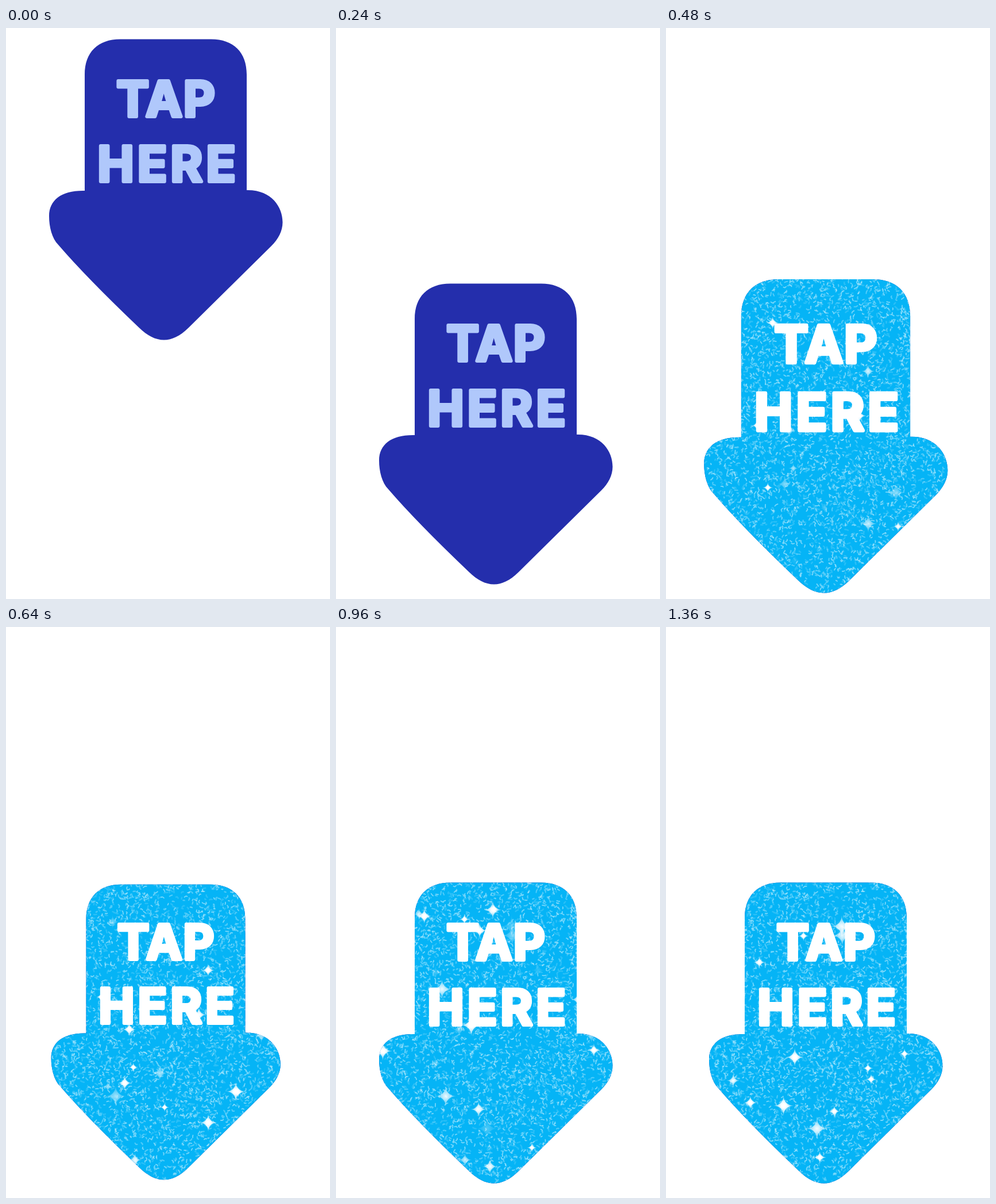
These frames come from a looping animation (564 by 993 pixels, 1440 ms). An HTML page with a canvas:

```html
<!DOCTYPE html>
<html lang="en">
<head>
<meta charset="utf-8">
<title>Tap here</title>
<style>
  html, body { margin: 0; width: 100%; height: 100%; overflow: hidden; background: #fff; }
  canvas { display: block; width: 564px; height: 993px; }
</style>
</head>
<body>
<canvas id="stage" width="564" height="993"></canvas>
<script>
const W = 564, H = 993, STEP = 80, LOOP = 1440;
const FALL = 425, LANDED = 229, WOBBLE_FROM = 320, GLITTER_FROM = 480, SETTLED = 800;
const BLUE = '#242eac', PALE = '#b0c8fb', SKY = '#05b4f6';
const CENTER = 278, ARROW_PIVOT = 620, TEXT_PIVOT = 503;
const ctx = document.getElementById('stage').getContext('2d');

const arrow = new Path2D(`
  M137 81 C137 42 160 19.5 199 19.5 H357 C396 19.5 419 42 419 81 V282
  C462 281 481.5 311 481.5 338 C481.5 353 474 367 462 379
  L317 522 C303 535.5 289 542.5 275 542.5 C260 542.5 246 535 232 521.5
  Q140 434 91 377 C80 366 75 346 75 327 C75 299 97 282 137 283 Z`);

// Height still to fall, at constant speed
const heightAt = t => FALL * Math.max(0, 1 - t / LANDED);

// Damped spring after the landing
function scaleAt(t) {
  if (t < WOBBLE_FROM || t >= SETTLED) return 1;
  return 1 + 0.102 * Math.exp((400 - t) / 138) * Math.sin(Math.PI * (t - 445) / 128);
}

function randomFrom(seed) {
  return () => {
    seed = (seed * 1664525 + 1013904223) >>> 0;
    return seed / 4294967296;
  };
}

// Sky blue sheet covered with short pale flecks
function makeGlitter(seed) {
  const sheet = document.createElement('canvas');
  sheet.width = W;
  sheet.height = H;
  const g = sheet.getContext('2d');
  const rnd = randomFrom(seed);
  g.fillStyle = SKY;
  g.fillRect(0, 0, W, H);
  g.strokeStyle = '#fff';
  g.lineCap = g.lineJoin = 'round';
  for (let layer = 1; layer <= 3; layer++) {
    g.globalAlpha = 0.15 * layer;
    g.lineWidth = 2.7 - 0.3 * layer;
    g.beginPath();
    for (let i = 0; i < 1900; i++) {
      let x = 70 + rnd() * 416, y = 434 + rnd() * 548, angle = rnd() * 2 * Math.PI;
      g.moveTo(x, y);
      for (let k = 0; k < 2; k++) {
        const len = 0.8 + rnd() * 2.6;
        x += Math.cos(angle) * len;
        y += Math.sin(angle) * len;
        g.lineTo(x, y);
        angle += (rnd() - 0.5) * 2.6;
      }
    }
    g.stroke();
  }
  return sheet;
}

const sheets = [7, 41, 93].map(makeGlitter);

const rnd = randomFrom(2024);
const stars = Array.from({ length: 75 }, () => ({
  x: 75 + rnd() * 407,
  y: 480 + rnd() * 475,
  arm: 8 + 11 * rnd() ** 1.5,
  peak: GLITTER_FROM - 60 + rnd() * 1060,
  fade: 160 + rnd() * 180
}));

function drawStar({ x, y, arm, peak, fade }, t) {
  const light = Math.min(1, 1.35 * (1 - Math.abs(t - peak) / fade));
  if (light <= 0) return;
  ctx.save();
  ctx.translate(x, y);
  ctx.scale(arm, arm);
  ctx.globalAlpha = light;
  const glow = ctx.createRadialGradient(0, 0, 0, 0, 0, 0.6);
  glow.addColorStop(0, 'rgba(255,255,255,.95)');
  glow.addColorStop(0.35, 'rgba(255,255,255,.35)');
  glow.addColorStop(1, 'rgba(255,255,255,0)');
  ctx.fillStyle = glow;
  ctx.fillRect(-1, -1, 2, 2);
  const beam = ctx.createRadialGradient(0, 0, 0.2, 0, 0, 1);
  beam.addColorStop(0, '#fff');
  beam.addColorStop(1, 'rgba(255,255,255,.3)');
  ctx.fillStyle = beam;
  ctx.beginPath();
  ctx.moveTo(1, 0);
  for (let i = 0; i < 4; i++) {
    ctx.quadraticCurveTo(0.05, 0.05, 0, 1);
    ctx.rotate(Math.PI / 2);
  }
  ctx.fill();
  ctx.restore();
}

// Moves to resting coordinates, scaled about a point on the center line
function place(t, pivot) {
  const scale = scaleAt(t);
  ctx.translate(CENTER, pivot - heightAt(t));
  ctx.scale(scale, scale);
  ctx.translate(-CENTER, FALL - pivot);
}

function drawArrow(t) {
  ctx.save();
  place(t, ARROW_PIVOT);
  ctx.fillStyle = BLUE;
  ctx.fill(arrow);
  if (t >= GLITTER_FROM) {
    // The glitter stays put on the stage while the arrow scales over it
    ctx.clip(arrow);
    ctx.resetTransform();
    ctx.drawImage(sheets[(t / STEP) % sheets.length], 0, 0);
    stars.forEach(star => drawStar(star, t));
  }
  ctx.restore();
}

function drawLine(text, x, y, gap) {
  ctx.letterSpacing = gap + 'px';
  ctx.fillText(text, x + gap / 2, y);
  ctx.strokeText(text, x + gap / 2, y);
}

function drawText(t) {
  ctx.save();
  place(t, TEXT_PIVOT);
  ctx.font = '700 85px Inter, "Open Sans", sans-serif';
  ctx.textAlign = 'center';
  ctx.lineJoin = 'round';
  ctx.lineWidth = 6;
  ctx.fillStyle = ctx.strokeStyle = t < GLITTER_FROM ? PALE : '#fff';
  drawLine('TAP', 278, 154, 2);
  drawLine('HERE', 279.5, 267, 6);
  ctx.restore();
}

function draw(t) {
  ctx.fillStyle = '#fff';
  ctx.fillRect(0, 0, W, H);
  drawArrow(t);
  drawText(t);
}

const start = performance.now();
let shown = -1;
function tick() {
  const step = Math.floor(((performance.now() - start) % LOOP) / STEP);
  if (step !== shown) draw((shown = step) * STEP);
  requestAnimationFrame(tick);
}
tick();
</script>
</body>
</html>
```
